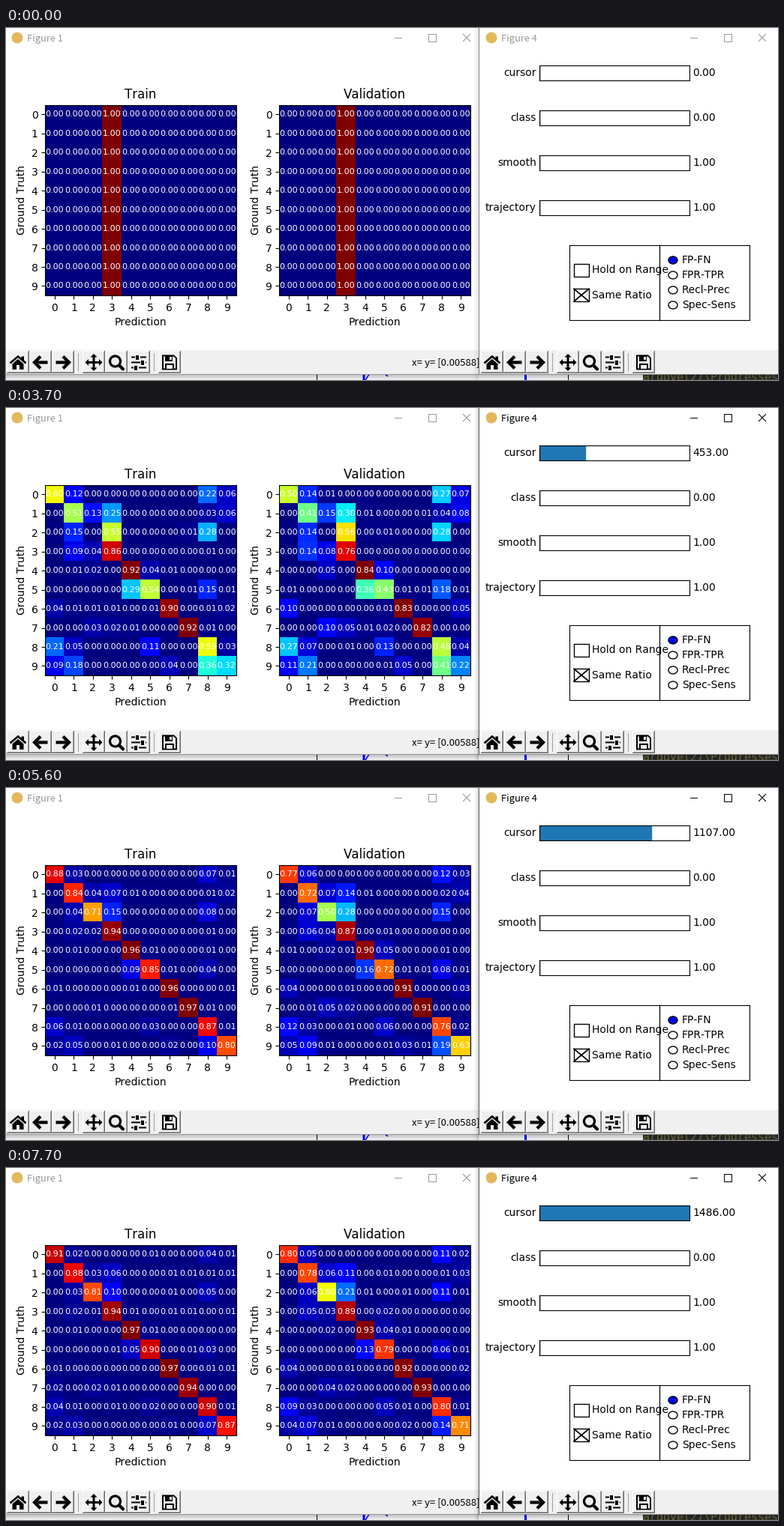
A matplotlib script for the animation above (8.5 s loop, 1029 px wide and 470 px high).

```python
import matplotlib.pyplot as plt
import numpy as np
from matplotlib.animation import FuncAnimation
from matplotlib.patches import Circle, Ellipse, Polygon, Rectangle

W, H, DPI, STEP, LOOP = 1029, 470, 100, 100, 8500
MAX_CURSOR = 1486
PT = 72 / DPI  # points per pixel
UI_FONT = "Noto Sans CJK JP"
plt.rcParams.update({"font.family": "DejaVu Sans", "font.size": 10,
                     "text.kerning_factor": 6})

fig = plt.figure(figsize=(W / DPI, H / DPI), dpi=DPI, facecolor="white")
rng = np.random.default_rng(4)


# ---------- drawing helpers (pixel coordinates, y down) ----------
def panel(x, y, w, h):
    return fig.add_axes([x / W, 1 - (y + h) / H, w / W, h / H])


base = panel(0, 0, W, H)
base.set(xlim=(0, W), ylim=(H, 0))
base.axis("off")


def rect(x, y, w, h, color, alpha=1):
    return base.add_patch(Rectangle((x, y), w, h, fc=color, ec="none", lw=0,
                                    alpha=alpha, zorder=1))


def line(xs, ys, color="black", px=1.0, cap="butt"):
    return base.plot(xs, ys, color=color, lw=px * PT, zorder=1, snap=False,
                     solid_capstyle=cap, solid_joinstyle="miter")[0]


def poly(cx, cy, pts, color="black"):
    base.add_patch(Polygon([(cx + x, cy + y) for x, y in pts], fc=color,
                           ec="none", lw=0, zorder=1))


def label(x, y, s, **kw):
    return base.text(x, y, s, zorder=1, **kw)


# ---------- toolbar icons ----------
def home(x, y):
    line([x - 10.5, x, x + 10.5], [y + 1, y - 8, y + 1], px=2.6)
    poly(x, y, [(4.5, -8), (8, -8), (8, -1), (4.5, -4)])
    poly(x, y, [(-7.5, 2), (0, -4.5), (7.5, 2), (7.5, 9.5), (2, 9.5),
                (2, 3.5), (-2, 3.5), (-2, 9.5), (-7.5, 9.5)])


def arrow(x, y, d):
    line([x, x + 8 * d, x], [y - 8, y, y + 8], px=4.2)
    line([x - 9.5 * d, x + 8 * d], [y, y], px=4.2)


def back(x, y):
    arrow(x, y, -1)


def forward(x, y):
    arrow(x, y, 1)


def move(x, y):
    line([x - 8, x + 8], [y, y], px=3)
    line([x, x], [y - 8, y + 8], px=3)
    for dx, dy in ((1, 0), (-1, 0), (0, 1), (0, -1)):
        poly(x, y, [(11.5 * dx, 11.5 * dy),
                    (7 * dx + 4.5 * dy, 7 * dy + 4.5 * dx),
                    (7 * dx - 4.5 * dy, 7 * dy - 4.5 * dx)])


def zoom(x, y):
    base.add_patch(Circle((x - 1.5, y - 1.5), 7, fc="none", ec="black",
                          lw=3.2 * PT, zorder=1))
    line([x + 4, x + 9], [y + 4, y + 9], px=4.2, cap="round")


def sliders(x, y):
    for dy, knob in ((-7, -2), (0, 5), (7, -4)):
        line([x - 10, x + 10], [y + dy, y + dy], px=2)
        rect(x + knob - 3.5, y + dy - 3, 7, 6, "#f0f0f0")
        rect(x + knob - 2, y + dy - 3, 4, 6, "black")


def save(x, y):
    poly(x, y, [(-10, -10), (6, -10), (10, -6), (10, 10), (-10, 10)])
    poly(x, y, [(-8, -8), (5.5, -8), (8, -5.5), (8, 8), (-8, 8)], "#f0f0f0")
    rect(x - 6, y - 9, 10, 7, "black")
    rect(x, y - 7.5, 2.5, 4, "#f0f0f0")
    rect(x - 6, y + 1, 12, 8, "black")
    rect(x - 4, y + 3, 8, 5.5, "#f0f0f0")


TOOLS = ((16, home), (46, back), (76, forward), (117, move), (147, zoom),
         (177, sliders), (218, save))


def toolbar(x0, right):
    rect(x0, 430, right - x0, 32, "#f0f0f0")
    for cx, icon in TOOLS:
        x = x0 + cx - 15
        rect(x, 431, 30, 30, "#696969")
        rect(x, 431, 29, 29, "white")
        rect(x + 1, 432, 28, 28, "#a0a0a0")
        rect(x + 1, 432, 27, 27, "#f0f0f0")
        icon(x0 + cx, 446.5)
    for cx in (97, 198):
        line([x0 + cx - 0.5] * 2, [434, 459], "#a0a0a0")


def title_bar(x0, close_x, name):
    base.add_patch(Circle((x0 + 15, 13), 7.5, fc="#e3b85c", ec="none",
                          zorder=1))
    gray = "#999999"
    c = close_x
    marks = [line([c - 96, c - 86], [13.5] * 2, gray),
             line([c - 50.5, c - 40.5, c - 40.5, c - 50.5, c - 50.5],
                  [8.5, 8.5, 18.5, 18.5, 8.5], gray),
             line([c - 5, c + 5], [8, 18], gray, 1.1),
             line([c - 5, c + 5], [18, 8], gray, 1.1)]
    text = label(x0 + 28, 18, name, color=gray, fontsize=9.3, family=UI_FONT)
    return marks + [text]


# ---------- desktop strip behind the windows ----------
rect(0, 455, W, 15, "white")
for x in (414.5, 749.5):
    line([x, x], [460, 470])
line([477, 477], [460, 470], "blue", 3)
line([479, 485], [470, 461], "blue", 1.5)
line([506, 509], [463, 465], "blue", 1.5)
line([692.5, 692.5], [460, 470], "blue", 3)
rect(849, 455, 180, 15, "#2b2b2b")
label(849, 471, r"ardovel27\Progresses", color="#77733f", fontsize=10.8,
      family="DejaVu Sans Mono", clip_on=True)
for i in range(8):
    rect(0, 462 + i, W, 1, "black", 0.26 * (1 - i / 9))

# ---------- windows ----------
rect(0, 0, 630, 462, "white")
toolbar(0, 630)
title_bar(0, 614, "Figure 1")
label(541, 450.5, "x= y= [0.00588]", fontsize=9.5, family=UI_FONT)
line([0, 630], [462.5] * 2, "#9a9a9a")

shadow = [rect(622 + i, 0, 1, 470, "black", 0.02) for i in range(8)]
rect(630, 0, 399, 462, "white")
toolbar(632, W)
rect(631, 430, 1, 32, "#f0f0f0")
line([630, W], [462.5] * 2, "#8a8a8a")
border = line([630.5] * 2, [0, 463], "#808080")
title_parts = title_bar(632, 1008, "Figure 4")

# ---------- confusion matrices ----------
# which classes each class is taken for, most frequent first
EARLY = ((0, 6, 3, 8), (3, 6, 0, 8), (3, 8, 4, 6), (3,), (4,),
         (4, 8), (6, 0), (3, 6, 0, 8), (3, 0, 4, 6, 8), (6, 0, 3, 8))
RIVALS = ((8, 1, 9), (3, 2, 9, 8), (3, 8, 1), (1, 2), (5, 2),
          (4, 8), (0, 9), (2, 3), (0, 5, 1, 9), (8, 1, 0, 6))
HARD = (0.39, 0.48, 1, 0.12, 0.05, 0.45, 0.05, 0.05, 0.4, 0.68)


def normalized(t):
    return t / t.sum(axis=1, keepdims=True)


def collapsed():
    """Untrained network: everything is taken for class 3."""
    t = np.zeros((10, 10))
    t[:, 3] = 1
    return t


def early(pull=None):
    """Only a few classes are predicted; pull reweights whole columns."""
    t = np.zeros((10, 10))
    for r, cols in enumerate(EARLY):
        ratio = 0.2 if 1 <= r <= 6 else 0.75
        for k, c in enumerate(cols):
            t[r, c] = ratio ** k
    t = normalized(t)
    for c, factor in (pull or {}).items():
        t[:, c] *= factor
    used = t.any(axis=0)
    return normalized(t + used * rng.exponential(0.006, t.shape))


def learned(scale, gap=0.0):
    """Each class loses its scaled difficulty to its rivals, halving by rank."""
    t = np.zeros((10, 10))
    for r, cols in enumerate(RIVALS):
        err = min(1, (HARD[r] + gap) * scale)
        share = 0.5 ** np.arange(len(cols))
        t[r, r] = 1 - err
        t[r, list(cols)] = err * share / share.sum()
    return normalized(t + rng.exponential(0.003, t.shape))


class Matrix:
    def __init__(self, x, title):
        ax = panel(x, 102.6, 254.6, 254.6)
        self.image = ax.imshow(collapsed(), cmap="jet", aspect="auto",
                               interpolation="nearest")
        ax.set(title=title, xlabel="Prediction", ylabel="Ground Truth",
               xticks=range(10), yticks=range(10))
        self.cells = [ax.text(c, r, "", color="white", fontsize=8,
                              ha="center", va="center")
                      for r in range(10) for c in range(10)]

    def show(self, t):
        self.image.set_data(t)
        self.image.set_clim(0, t.max())
        for cell, v in zip(self.cells, t.flat):
            cell.set_text(f"{v:.2f}")


train = Matrix(52.2, "Train")
val = Matrix(364.2, "Validation")


# ---------- sliders and buttons ----------
def slider(y, name, value):
    ax = panel(711, y, 200, 20)
    ax.set(xlim=(0, 1), ylim=(0, 1), xticks=[], yticks=[])
    bar = ax.add_patch(Rectangle((0, 0), 0, 1, color="tab:blue"))
    ax.axvline(0, color="red", lw=1)
    ax.text(-0.02, 0.5, name, ha="right", va="center")
    text = ax.text(1.02, 0.5, value, ha="left", va="center")
    return bar, text


cursor_bar, cursor_text = slider(50, "cursor", "0.00")
slider(110, "class", "0.00")
slider(170, "smooth", "1.00")
slider(230, "trajectory", "1.00")


def choices(x):
    ax = panel(x, 290, 120, 100)
    ax.set(xlim=(0, 1), ylim=(0, 1), xticks=[], yticks=[])
    ax.patch.set_visible(False)
    return ax


radio = choices(871)
for i, name in enumerate(("FP-FN", "FPR-TPR", "Recl-Prec", "Spec-Sens")):
    y = 0.8 - 0.2 * i
    radio.add_patch(Ellipse((0.15, y), 0.1, 0.1, ec="black", lw=1,
                            fc="white" if i else "blue"))
    radio.text(0.25, y, name, va="center")

check = choices(751)
for y, name, on in ((2 / 3, "Hold on Range", False),
                    (1 / 3, "Same Ratio", True)):
    lo, hi = y - 1 / 12, y + 1 / 12
    check.add_patch(Rectangle((0.05, lo), 1 / 6, 1 / 6, fc="white",
                              ec="black", lw=1))
    if on:
        for ys in ((lo, hi), (hi, lo)):
            check.plot((0.05, 0.05 + 1 / 6), ys, color="black", lw=1.3)
    check.text(0.25, y, name, va="center")

# ---------- timeline ----------
TABLES = [(0, collapsed(), collapsed()),
          (2700, early(), early({6: 4, 0: 0.05}))]
for start, seen, unseen in ((3700, 1, 1), (4600, 0.5, 0.75),
                            (5600, 0.27, 0.45), (6600, 0.2, 0.42),
                            (7700, 0.18, 0.35)):
    TABLES.append((start, learned(seen), learned(unseen, gap=0.1)))
# late in the run the slider is redrawn one tick after the matrices
CURSOR = ((0, 0), (2700, 104), (3700, 453), (4700, 1107), (5700, 1359),
          (6700, 1425), (7700, MAX_CURSOR))
FOCUS_AT = 1600


def current(events, t):
    return [e for e in events if e[0] <= t][-1]


def update(n):
    t = n * STEP
    _, left, right = current(TABLES, t)
    train.show(left)
    val.show(right)
    value = current(CURSOR, t)[1]
    cursor_bar.set_width(value / MAX_CURSOR)
    cursor_text.set_text(f"{value:.2f}")
    active = t >= FOCUS_AT
    for part in title_parts:
        part.set_color("black" if active else "#999999")
    border.set_color("#606060" if active else "#808080")
    for i, s in enumerate(shadow):
        s.set_alpha(0.012 * i + (0.03 * (i - 4) if active and i > 4 else 0))
    return []


anim = FuncAnimation(fig, update, frames=LOOP // STEP, interval=STEP,
                     init_func=lambda: update(0), repeat=True,
                     repeat_delay=0, blit=False)
plt.show()
```
